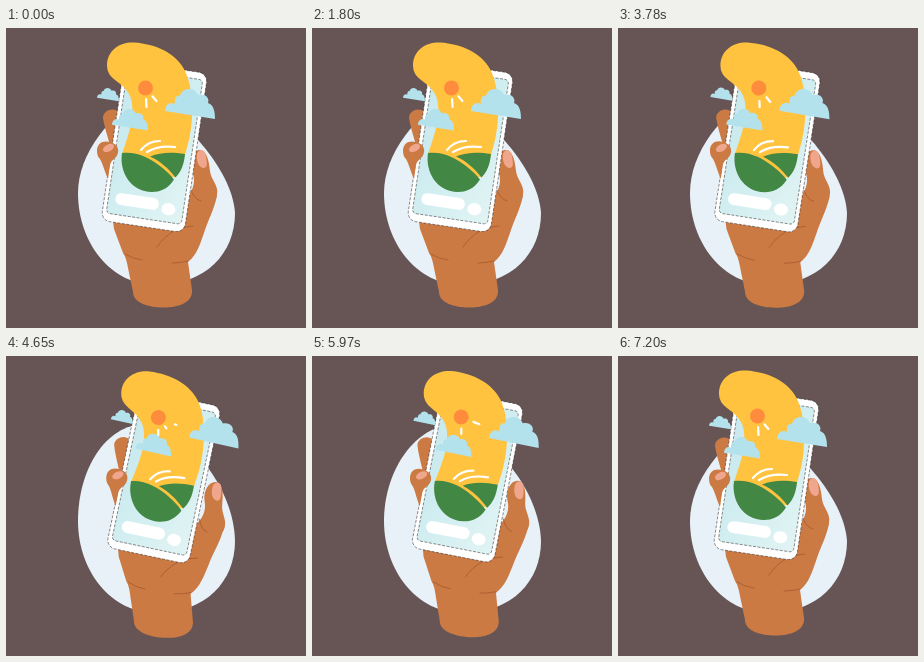
Animation of 300x300 px, one loop 7260 ms. Source, as an HTML page:

```html
<!DOCTYPE html>
<html lang="en">
<head>
<meta charset="utf-8">
<title>Phone in hand</title>
<style>
html, body { margin: 0; width: 100%; height: 100%; overflow: hidden; background: #675555; }
svg { display: block; width: 100vw; height: 100vh; }
.skin { fill: #cb7a44; }
.nail { fill: #f0a68c; }
.line { fill: none; stroke: #a9592c; stroke-width: .8; stroke-linecap: round; }
.white { fill: none; stroke: #fff; stroke-width: 2.2; stroke-linecap: round; }
.edge { stroke: #2b2626; stroke-width: .5; stroke-dasharray: 3 1.5; }
.green { fill: #438744; }
</style>
</head>
<body>
<svg viewBox="0 0 300 300">
  <defs>
    <linearGradient id="glass" x1="0" y1="0" x2="1" y2="1">
      <stop offset="0" stop-color="#c6e8ed"/>
      <stop offset=".55" stop-color="#d2eef1"/>
      <stop offset="1" stop-color="#e2f4f4"/>
    </linearGradient>
    <path id="cloud" fill="#b3e2ec" d="M0 22C0 16 5 12 10 15C9 9 12 6 15 7C17-2 30-2 33 6C40 4 45 9 43 14C49 16 50 23 50 30Z"/>
  </defs>
  <rect width="300" height="300" fill="#675555"/>
  <path id="blob" fill="#e9f1f8"/>

  <g id="hand">
    <path class="skin" d="M97 90C97 82 108 79 112 84L120 150H112C108 126 99 104 97 90Z"/>
    <path class="skin" d="M106 185L108 201L117 225C120 229 121 235 122 240L127 264C127 275 143 279.500 157 279.500C174 279.500 187 274 186 262L182 234C191 227 194 216 198 205C202 192 208 182 211 168L205 165L182 172Z"/>
    <g id="thumb">
      <path class="skin" d="M176 190L181 170C188 161 190 152 186 143C182 132 187 121 195 122C201 124 203 133 204 143C205 152 213 157 211 167L206 181Z"/>
      <path class="nail" d="M191 126C193 120 199 121 200 128C201 135 202 139 198 140C193 140 190 133 191 126Z"/>
      <path class="line" d="M185 162Q188 171 195 173"/>
    </g>
    <path class="line" d="M151 219C160 206 171 199 187 198M119 226Q127 231 136 232M166 235Q174 235 182 233"/>

    <g transform="translate(148.500 118.500) rotate(8.500)">
      <rect class="edge" x="-42" y="-80" width="84" height="161" rx="9" fill="#fff"/>
      <rect class="edge" x="-38" y="-73" width="76" height="146" rx="4" fill="url(#glass)"/>
      <rect x="-31" y="51" width="44" height="12" rx="6" fill="#fff"/>
      <ellipse cx="23" cy="60" rx="7" ry="6" fill="#fff"/>
    </g>

    <path class="skin" d="M91 123C91 115 97 112 104 114C113 116 114 124 110 129C107 132 105 133 104 137L102 151C98 142 97 136 94 131Q91 128 91 123Z"/>
    <ellipse class="nail" cx="102.500" cy="120" rx="6" ry="3.500" transform="rotate(-28 102.500 120)"/>

    <path fill="#ffc33f" d="M101 38C101 22 114 14 128 14.500C150 16 169 25 178 41C188 60 188 90 183 112L179 127L170 149L150 150L116 126C122 108 128 92 126 76C125 64 117 58 109 52Q101 46 101 38Z"/>
    <path class="green" d="M116 125C130 123 144 130 154 138Q163 145 168 151.500C162 161 154 164 146 164C125 164 113 144 116 125Z"/>
    <path class="green" d="M144 128.500C155 124 166 124 179 126C178 137 175 144 169.500 149.500C162 140 154 133 144 128.500Z"/>
    <path class="white" d="M135 122Q142 113 154 113M141 124Q152 117 169 119"/>
    <g transform="translate(139.500 60)">
      <circle r="7.500" fill="#ff8b3d"/>
      <path id="rays" class="white"/>
    </g>
  </g>

  <use href="#cloud" id="big"/>
  <use href="#cloud" id="mid"/>
  <use href="#cloud" id="small"/>
</svg>
<script>
const $ = id => document.getElementById(id);
const lerp = (a, b, k) => a + (b - a) * k;

// Keys are [swing, from, to]: the visible span of a ray, measured from the sun's centre
const rays = [
  { angle: 87, keys: [[0, 11, 19], [.1, 13, 19], [.7, 11.5, 17], [1, 12.5, 18]] },
  { angle: 50, keys: [[0, 11, 17], [.1, 12, 18], [.35, 18, 18], [.7, 11, 11], [.93, 11, 13.5], [1, 11, 15]] },
  { angle: 19, keys: [[0, 11, 11], [.35, 11, 11], [.7, 13, 19.5], [.93, 18, 19.5], [1, 19.5, 19.5]] }
];

function rayPath({ angle, keys }, p) {
  const i = Math.max(1, keys.findIndex(k => k[0] >= p));
  const a = keys[i - 1], b = keys[i];
  const k = (p - a[0]) / (b[0] - a[0]);
  const from = lerp(a[1], b[1], k), to = lerp(a[2], b[2], k);
  if (to - from < .3) return '';
  const x = Math.cos(angle * Math.PI / 180), y = Math.sin(angle * Math.PI / 180);
  return `M${x * from} ${y * from}L${x * to} ${y * to}`;
}

function place(id, x, y, dx, dy, scale, p) {
  $(id).setAttribute('transform',
    `translate(${x + dx * p} ${y + dy * p}) rotate(${3.5 * p}) scale(${scale})`);
}

function draw(ms) {
  const t = Math.min(7200, Math.floor(ms % 7260 / 30) * 30);
  const p = (1 - Math.cos(t / 900 * Math.PI)) / 2;

  $('hand').setAttribute('transform', `rotate(${3.6 * p} 120 280)`);
  $('thumb').setAttribute('transform', `rotate(${9.5 * p} 203 171)`);
  $('blob').setAttribute('d',
    `M72 165C72 ${lerp(125, 114, p)} ${lerp(105, 98, p)} ${lerp(85, 67, p)} 140 68
     C${lerp(175, 184, p)} ${lerp(88, 76, p)} ${lerp(226, 228, p)} ${lerp(140, 131, p)} 229 185
     C229 225 200 257 150 257C105 257 72 215 72 165Z`);
  $('rays').setAttribute('d', rays.map(r => rayPath(r, p)).join(''));
  place('big', 159, 61, 27, -1.5, 1, p);
  place('mid', 106, 81, 26, -4.5, .72, p);
  place('small', 91, 60, 15.5, -7, .44, p);
}

const start = performance.now();
function frame() {
  draw(performance.now() - start);
  requestAnimationFrame(frame);
}
frame();
</script>
</body>
</html>
```
